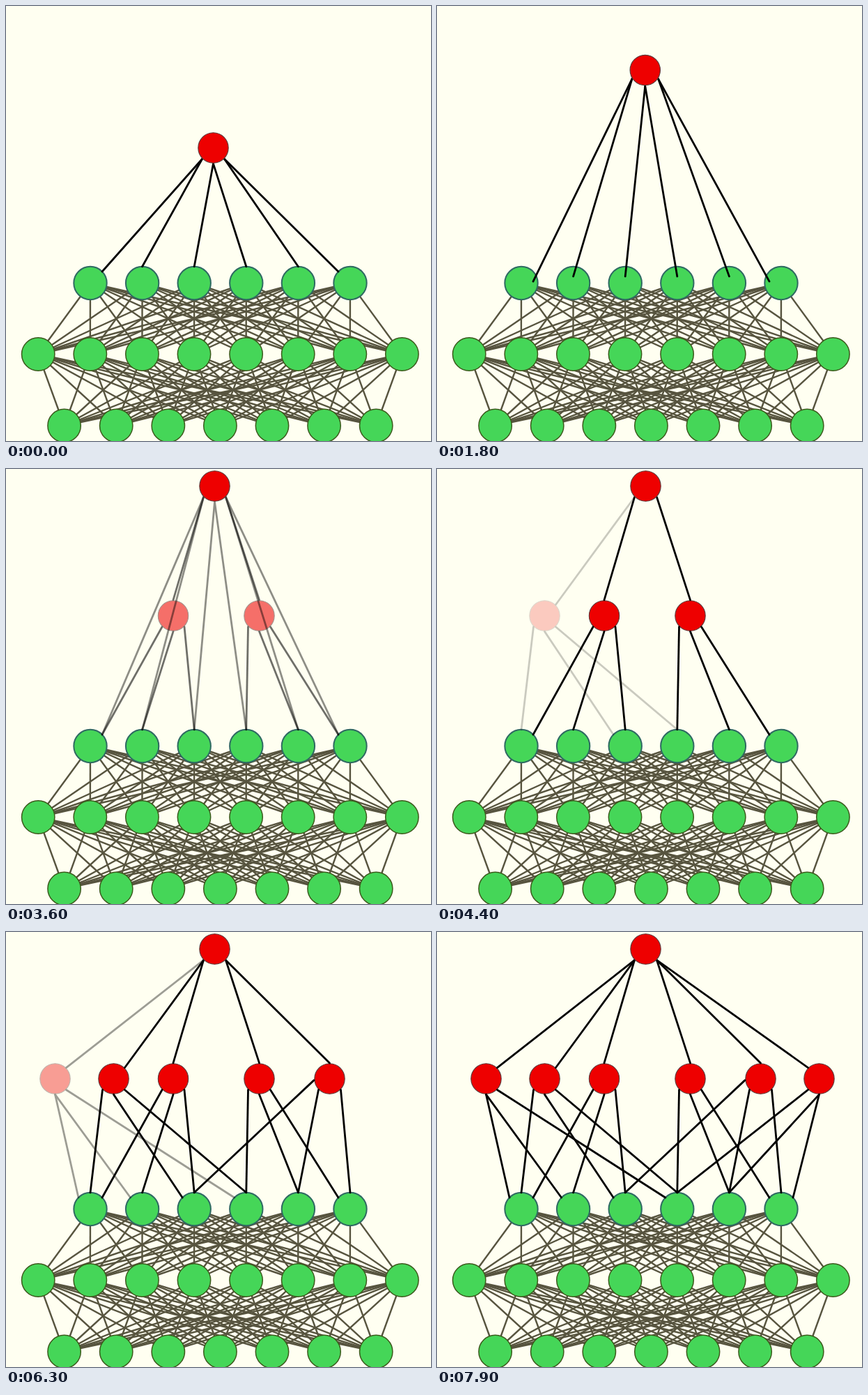
Recreate the animation shown at these times as an HTML page. Size 610 by 624 pixels, loop 8000 ms.

```html
<!DOCTYPE html>
<html lang="en">
<head>
<meta charset="utf-8">
<title>Growing network</title>
<style>
  html, body { margin: 0; width: 100%; height: 100%; overflow: hidden; background: #fffff1; }
  svg { display: block; width: 610px; height: 624px; }
  .mesh { stroke: #57543f; stroke-width: 2.4; }
  .edge { stroke: #000; stroke-width: 2.8; stroke-linecap: round; }
  .green { fill: #45d658; stroke: #3c5a1c; stroke-width: 1.5; }
  .first { stroke: #2f6a62; stroke-width: 2; }
  .red { fill: #ee0000; stroke: #5a3a3a; stroke-width: 1.1; }
</style>
</head>
<body>
<svg id="stage" viewBox="0 0 610 624"></svg>
<script>
const LOOP = 8000, FADE = 500;
const MOVE = { start: 620, time: 2040 };
const ROOT = { x: 299.5, y: 24.5 };
const CHILD_Y = 210.5;
const svg = document.getElementById('stage');

function add(parent, tag, attrs = {}) {
  const el = document.createElementNS('http://www.w3.org/2000/svg', tag);
  for (const k in attrs) el.setAttribute(k, attrs[k]);
  parent.appendChild(el);
  return el;
}
const line = (parent, cls, a, b) =>
  add(parent, 'line', { class: cls, x1: a.x, y1: a.y, x2: b.x, y2: b.y });
const dot = (parent, cls, p, r) =>
  add(parent, 'circle', { class: cls, cx: p.x, cy: p.y, r });
const row = (count, x, y) =>
  Array.from({ length: count }, (_, i) => ({ x: x + i * 74.6, y }));

// Point on a node's rim at horizontal offset dx; side is 1 below, -1 above
const rim = (p, dx, r, side) =>
  ({ x: p.x + dx, y: p.y + side * Math.sqrt(Math.max(0, r * r - dx * dx)) });
const below = (p, dx) => rim(p, dx, 22.6, 1);
const above = (p, dx, r = 22.6) => rim(p, dx, r, -1);

const rows = [row(6, 121, 397.5), row(8, 46.2, 499.5), row(7, 83.6, 602)];
for (let i = 0; i < 2; i++)
  for (const a of rows[i]) for (const b of rows[i + 1]) line(svg, 'mesh', a, b);
rows.forEach((nodes, i) =>
  nodes.forEach(p => dot(svg, i ? 'green' : 'green first', p, 23.7)));

// legs: [offset at the child, index in the first row, offset at the green node]
const children = [
  { x: 240, start: 3320, root: -16, top: 0, legs: [[-16, 0, 17], [0, 1, 0], [16, 2, 0]] },
  { x: 363.5, start: 3320, root: 16, top: 0, legs: [[-16, 3, 0], [0, 4, 0], [16, 5, -17]] },
  { x: 154.5, start: 4300, root: -16, top: 16, legs: [[-16, 0, 0], [0, 2, -17], [16, 3, 0]] },
  { x: 464.5, start: 5310, root: 16, top: 0, legs: [[-22.5, 2, 0], [-16, 4, 0], [16, 5, 0]] },
  { x: 70.5, start: 6110, root: -16, top: 16, legs: [[0, 0, -17], [0, 1, -17], [16, 3, -17]] },
  { x: 548.5, start: 7050, root: 16, top: -16, legs: [[-16, 3, 0], [0, 4, 0], [0, 5, 17]] }
];
for (const c of children) {
  const p = { x: c.x, y: CHILD_Y };
  c.group = add(svg, 'g');
  dot(c.group, 'red', p, 21.7);
  line(c.group, 'edge', below(ROOT, c.root), above(p, c.top));
  for (const [dx, i, end] of c.legs)
    line(c.group, 'edge', below(p, dx), above(rows[0][i], end, 23.7));
}

const direct = add(svg, 'g');
const spokes = rows[0].map((p, i) => ({
  side: [-1, -1, 0, 0, 1, 1][i],
  end: above(p, [17, 0, 0, 0, 0, -17][i], 23.7),
  el: line(direct, 'edge', p, p)
}));
const root = dot(svg, 'red', ROOT, 21.7);

const clamp = v => Math.min(1, Math.max(0, v));
const fade = (t, start) => clamp((t - start) / FADE);

function draw(t) {
  const p = (1 - Math.cos(Math.PI * clamp((t - MOVE.start) / MOVE.time))) / 2;
  const lag = 4 * p * (1 - p);
  const x = ROOT.x - 2 * (1 - p), y = ROOT.y + 179 * (1 - p);
  root.setAttribute('cx', x);
  root.setAttribute('cy', y);
  for (const s of spokes) {
    const from = below({ x, y }, s.side * (16 + 3 * lag));
    s.el.setAttribute('x1', from.x);
    s.el.setAttribute('y1', from.y);
    s.el.setAttribute('x2', s.end.x);
    s.el.setAttribute('y2', s.end.y + 15 * lag);
  }
  direct.setAttribute('opacity', 1 - fade(t, children[0].start));
  for (const c of children) c.group.setAttribute('opacity', fade(t, c.start));
}

const begin = performance.now();
function tick() {
  draw((performance.now() - begin) % LOOP);
  requestAnimationFrame(tick);
}
tick();
</script>
</body>
</html>
```
